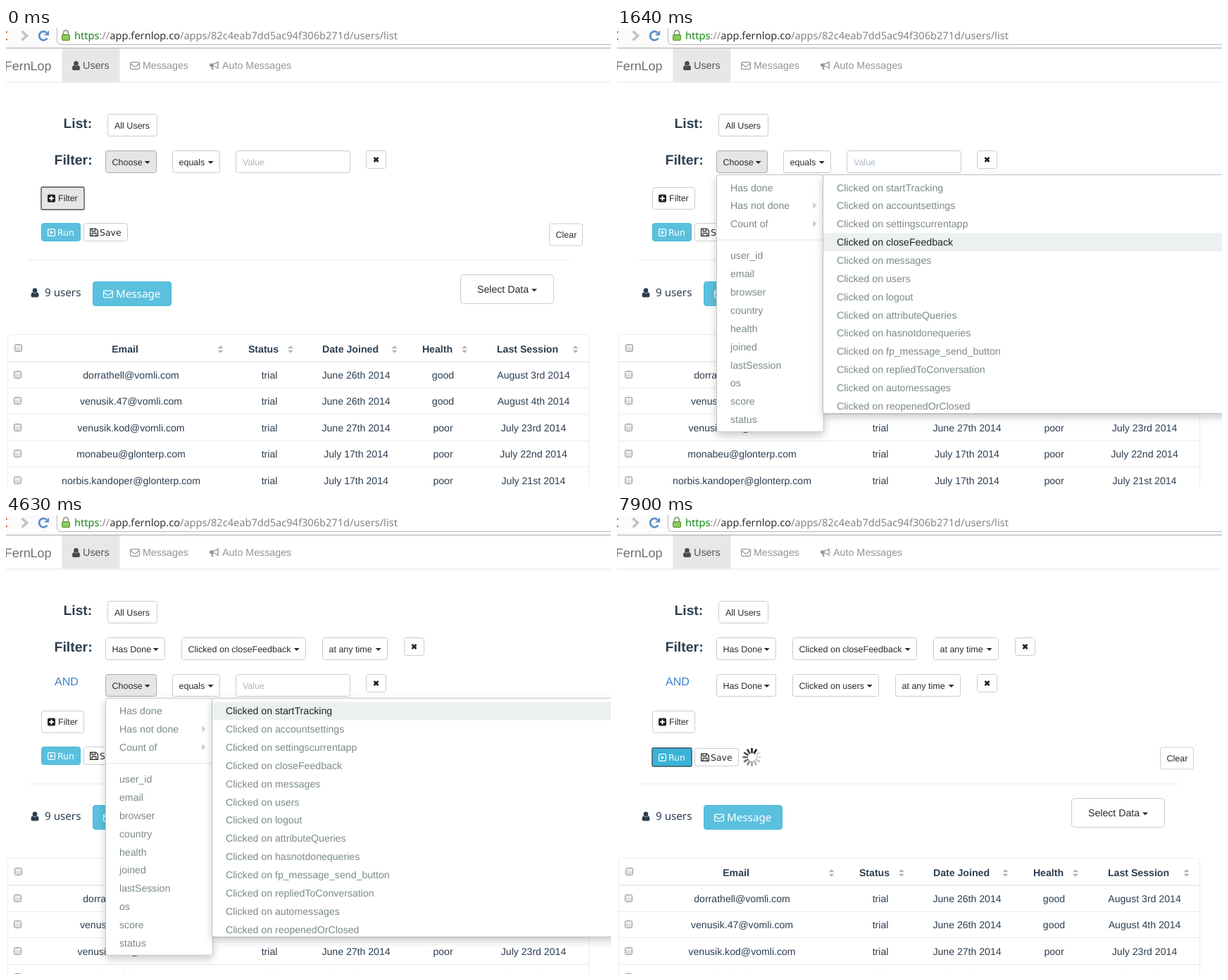
Write an HTML page that moves like this. It is 859x652 px and loops after 8000 ms.

```html
<!DOCTYPE html>
<html lang="en">
<head>
<meta charset="utf-8">
<title>User filter</title>
<style>
html, body { margin: 0; width: 100%; height: 100%; overflow: hidden; background: #fff; }
svg { display: block; width: 859px; height: 652px; }
text { font-family: "Liberation Sans", Arial, sans-serif; text-rendering: geometricPrecision; white-space: pre; }
.noto { font-family: "Noto Sans", "Open Sans", sans-serif; }
.deja { font-family: "DejaVu Sans", Verdana, sans-serif; }
.bold { font-weight: bold; }
.medium { font-weight: 500; }
.mid { text-anchor: middle; }
.end { text-anchor: end; }
.pop { filter: drop-shadow(0 5.7px 5.7px rgba(0, 0, 0, .2)); }
</style>
</head>
<body>
<svg id="stage" viewBox="0 0 859 652"></svg>
<script>
const LOOP = 8000, SHIFT = 52, ITEM = 25.87;
const INK = '#2c3e50', BTN = '#2b2b2b', GREY = '#7b8a8b', LINE = '#e9edee';
const BLUE = '#5bc0de', BLUE_EDGE = '#46b8da', PRESSED = '#e6e6e6';

const fields = ['user_id', 'email', 'browser', 'country', 'health', 'joined', 'lastSession', 'os', 'score', 'status'];
const events = ['startTracking', 'accountsettings', 'settingscurrentapp', 'closeFeedback', 'messages', 'users', 'logout',
  'attributeQueries', 'hasnotdonequeries', 'fp_message_send_button', 'repliedToConversation', 'automessages', 'reopenedOrClosed'];
const columns = [['Email', 169, 304.5], ['Status', 365.5, 404], ['Date Joined', 489, 551.5], ['Health', 612.5, 651], ['Last Session', 740.5, 808.5]];
const cellX = [177.5, 374, 497, 620.5, 749];
const people = [
  ['dorrathell@vomli.com', 'trial', 'June 26th 2014', 'good', 'August 3rd 2014'],
  ['venusik.47@vomli.com', 'trial', 'June 26th 2014', 'good', 'August 4th 2014'],
  ['venusik.kod@vomli.com', 'trial', 'June 27th 2014', 'poor', 'July 23rd 2014'],
  ['monabeu@glonterp.com', 'trial', 'July 17th 2014', 'poor', 'July 22nd 2014'],
  ['norbis.kandoper@glonterp.com', 'trial', 'July 17th 2014', 'poor', 'July 21st 2014']
];

// Times at which the pointer reaches "Has done" and then each event row
const hovers = [
  [450, 900, 1200, 1350, 1640],
  [4180, 4630, 4770, 4910, 5060, 5210, 5360]
];

const text = (x, y, s, size = 14.15, fill = INK, cls = '') =>
  `<text x="${x}" y="${y}" font-size="${size}" fill="${fill}" class="${cls}">${s}</text>`;
const path = (d, fill = 'none', stroke = 'none', w = 1) =>
  `<path d="${d}" fill="${fill}" stroke="${stroke}" stroke-width="${w}"/>`;
const box = (x, y, w, h, fill = '#fff', stroke = '#ccc', r = 3, sw = 1) =>
  `<rect x="${x + .5}" y="${y + .5}" width="${w - 1}" height="${h - 1}" rx="${r}" fill="${fill}" stroke="${stroke}" stroke-width="${sw}"/>`;
const bar = (x, y, w, h, fill) => `<rect x="${x}" y="${y}" width="${w}" height="${h}" fill="${fill}"/>`;
const move = (x, y, s) => `<g transform="translate(${x} ${y})">${s}</g>`;
const caret = (x, y) => path(`M${x} ${y}h8l-4 4z`, BTN);
const between = (t, a, b) => t >= a && t < b;

const person = (x, y, fill) => move(x, y,
  `<circle cx="5.5" cy="3.4" r="3.3" fill="${fill}"/>` +
  path('M0 10.5Q0 6 2.6 5.9Q5.5 8.4 8.4 5.9Q11 6 11 10.5Q11 13 8.8 13H2.2Q0 13 0 10.5z', fill));
const envelope = (x, y, c) => move(x, y,
  `<rect x=".6" y=".6" width="12.8" height="9.8" rx="1.4" fill="none" stroke="${c}" stroke-width="1.2"/>` +
  path('M1 2.8L5.6 6.4Q7 7.4 8.4 6.4L13 2.8', 'none', c, 1.2));
const horn = (x, y, c) => move(x, y,
  path('M12 1.2V10.2Q8.5 7.4 5 7.2V4.2Q8.5 4 12 1.2z', 'none', c, 1.3) +
  path('M1.5 3.6H5.4V7.8H4.4Q4.2 10 6 12H3.4Q2 10.4 2.4 7.8H1.5Q0 7.8 0 6.5V5Q0 3.6 1.5 3.6zM12.6 4.4q1.6 1.3 0 2.6z', c));
const cross = (x, y) => path(`M${x - 3} ${y - 3}l6 6m0 -6l-6 6`, 'none', '#222', 2.7);

function chrome() {
  const url = [['https', '#138a13'], ['://', '#8a8a8a'], ['app.fernlop.co', '#333'],
    ['/apps/82c4eab7dd5ac94f306b271d/users/list', '#858585']];
  return bar(0, 0, 859, 28, '#fbfbfb') + bar(0, 28, 859, 1, '#ababab') +
    path('M860 23.5H79Q72.5 23.5 72.5 17V-1H860z', '#fff', '#b9b9b9') +
    path('M0 6.5L1.5 5M0 15l1.5 2', 'none', '#d9541e', 2) +
    path('M22.5 4.5L29.5 11L22.5 17.5', 'none', '#c4c4c4', 3.6) +
    path('M58.5 14.5A6.2 6.2 0 1 1 57.5 6.5', 'none', '#5c8fca', 2.8) +
    path('M61 3.5V10.5H54z', '#5c8fca') +
    path('M81.5 10V6.8a3.4 3.4 0 0 1 6.8 0V10', 'none', '#8d9a80', 1.7) +
    box(79, 9, 12, 9, '#7cc04b', '#579a2c', 1) + path('M81 12.5h8m-8 2.5h8', 'none', '#a8dc80', 1) +
    text(97, 16, url.map(([s, c]) => `<tspan fill="${c}">${s}</tspan>`).join(''), 14.6, '#333', 'noto');
}

function navbar() {
  return bar(0, 76.5, 859, 1, '#e4e4e4') + bar(79.5, 29, 82, 47.5, '#e7e7e7') +
    text(64.5, 59.5, 'FernLop', 17.92, '#6f6f6f', 'end') +
    person(94, 47, '#4a4a4a') + text(109, 58, 'Users', 14.4, '#555') +
    envelope(176, 48, '#949494') + text(194, 58, 'Messages', 14.25, '#949494') +
    horn(289, 47, '#949494') + text(307, 58, 'Auto Messages', 14.25, '#949494');
}

function drop(x, y, w, label, on) {
  return box(x, y, w, 32, on ? PRESSED : '#fff', on ? '#adadad' : '#ccc') +
    text(x + 9.5, y + 20.5, label, 12.5, BTN) + caret(x + w - 17.3, y + 15);
}

const remove = (x, y) => box(x, y, 29, 26) + cross(x + 14.5, y + 13);

const emptyRow = (y, on) => drop(141, y, 73, 'Choose', on) + drop(236, y, 68, 'equals') +
  box(326, y, 163, 32) + text(336, y + 20.5, 'Value', 12.5, '#a9b7c2') + remove(511, y);

const doneRow = (y, event, w) => drop(141, y, 85, 'Has Done') + drop(249, y, w, 'Clicked on ' + event) +
  drop(272 + w, y, 93, 'at any time') + remove(388 + w, y);

function filterButton(state) {
  const rect = state === 'focus' ? box(49.5, 225.5, 62, 33, PRESSED, '#777', 2, 1.8)
    : state === 'hover' ? box(50, 226, 61, 32, PRESSED, '#adadad') : box(50, 226, 61, 32);
  return rect + `<rect x="59" y="236.5" width="11" height="11" rx="2" fill="#222"/>` +
    path('M64.5 238.7v6.6M61.2 242h6.6', 'none', '#fff', 2) + text(74, 246.3, 'Filter', 12.5, BTN);
}

function actions(t) {
  const focus = t >= 7750, hover = t >= 7310, save = between(t, 7010, 7310);
  const run = focus ? box(49.5, 276.5, 57, 27, '#39b3d7', '#4c7280', 2, 1.8)
    : box(50, 277, 56, 26, hover ? '#39b3d7' : BLUE, hover ? '#269abc' : BLUE_EDGE);
  const s = run +
    `<rect x="59.6" y="285.6" width="9.8" height="9.8" rx="1.6" fill="none" stroke="#fff" stroke-width="1.3"/>` +
    path('M62.8 287.8l4.4 2.7l-4.4 2.7z', '#fff') + text(73, 294.8, 'Run', 12.5, '#fff', 'deja') +
    box(110, 277, 63, 26, save ? PRESSED : '#fff', save ? '#adadad' : '#ccc') +
    path('M119.6 285.2h8l2.8 2.8v7.4h-10.8z', 'none', '#222', 1.2) +
    path('M122 285.2v3.4h4.6v-3.4M122 295.2v-3.8h6v3.8', 'none', '#222', 1.1) +
    text(133, 294.8, 'Save', 12.5, BTN, 'deja');
  return move(0, focus ? 2 : 0, s) + box(771, 277.5, 48, 32) + text(780.5, 298, 'Clear', 12.5, BTN);
}

const checkbox = (x, y) => box(x, y, 11, 11, '#dedede', '#9a9a9a', 2) + bar(x + 2, y + 2, 7, 3, '#ededed');

function table() {
  let s = path('M2.5 660V440Q2.5 435.5 7 435.5H823Q827.5 435.5 827.5 440V660', '#fff', LINE) +
    bar(2, 473, 826, 2, LINE) + checkbox(12, 449);
  for (const [name, x, sort] of columns)
    s += text(x, 460.5, name, 14.15, INK, 'bold mid') +
      path(`M${sort - 4} 455.3h8l-4 -4zM${sort - 4} 457.7h8l-4 4z`, '#b4b4b4');
  people.forEach((row, i) => {
    const y = 37.4 * i;
    s += bar(2, Math.round(511 + y), 826, 1, LINE) + checkbox(11, Math.round(487 + y));
    row.forEach((cell, c) => s += text(cellX[c], 498 + y, cell, 14.1, INK, 'mid'));
  });
  return s;
}

function results() {
  return bar(31, 329.5, 769, 1, '#ececec') + person(35.5, 369.5, INK) +
    text(55, 381, '9 users', 15.2, INK, 'noto medium') +
    box(123, 360, 112, 35, BLUE, BLUE_EDGE, 3.5) + envelope(138, 372.5, '#fff') +
    text(156, 383, 'Message', 15.2, '#fff', 'noto') +
    box(645, 350, 133, 42, '#fff', '#ccc', 4) + text(669, 376, 'Select Data', 14.15, BTN) + caret(746, 370.5) +
    table();
}

// hover: -2 main menu only, -1 "Has done" row, 0 and up an event row
function menu(hover) {
  let s = `<g class="pop">${box(141, 208, 153, 366, '#fff', '#c6c6c6', 3.5)}</g>`;
  if (hover === -1) s += bar(142, 213.7, 151, ITEM, '#ecf0f1');
  ['Has done', 'Has not done', 'Count of'].forEach((label, i) => {
    const y = 231.5 + ITEM * i;
    s += text(161, y, label, 14.15, hover === -1 && !i ? '#222' : GREY) +
      path(`M278.5 ${y - 10}l4.8 4.8l-4.8 4.8z`, i || hover === -2 ? '#ccc' : '#fff');
  });
  s += bar(142, 300.5, 151, 1, '#e2e2e2');
  fields.forEach((label, i) => s += text(161, 328.4 + ITEM * i, label, 14.15, GREY));
  if (hover < -1) return s;
  s += `<g class="pop">${box(292, 208, 600, 340, '#fff', '#bfbfbf', 3.5)}</g>`;
  if (hover >= 0) s += bar(293, 213.7 + ITEM * hover, 566, ITEM, '#ecf0f1');
  events.forEach((label, i) =>
    s += text(312, 231.5 + ITEM * i, 'Clicked on ' + label, 14.15, i === hover ? '#222' : GREY));
  return s;
}

function spinner(t) {
  const head = 13 + Math.floor((t - 7900) / 150);
  let s = '';
  for (let i = 0; i < 12; i++) {
    const age = (head - i + 24) % 12;
    s += `<path d="M0 -6.8V-12" transform="rotate(${i * 30})" stroke="#111" stroke-width="2.7" stroke-linecap="round" opacity="${Math.max(.16, 1 - age * .085).toFixed(2)}"/>`;
  }
  return move(191.5, 344, s);
}

function scene(t) {
  const two = t >= 3430;
  const focus = t < 150 || between(t, 3280, 3880);
  let s = chrome() + navbar() +
    text(81.5, 142.4, 'List:', 19.3, INK, 'bold') + box(144, 122, 71, 32) + text(154, 143, 'All Users', 12.5, BTN) +
    text(68.5, 194.4, 'Filter:', 19.5, INK, 'bold') +
    (t < 2390 ? emptyRow(174, true) : doneRow(174, 'closeFeedback', 177));
  if (two) s += text(69, 242, 'AND', 16.1, '#4180cc') +
    (t < 6110 ? emptyRow(226, t >= 3580) : doneRow(226, 'users', 123));
  s += move(0, two ? SHIFT : 0,
    filterButton(focus ? 'focus' : between(t, 2990, 3280) ? 'hover' : '') + actions(t) + results());
  const open = between(t, 150, 2390) ? 0 : between(t, 3880, 6110) ? 1 : -1;
  if (open >= 0) s += move(0, open * 2 * ITEM, menu(hovers[open].filter(at => t >= at).length - 2));
  return t >= 7750 ? s + spinner(t) : s;
}

const stage = document.getElementById('stage');
const start = performance.now();
let last = '';
function tick() {
  const s = scene((performance.now() - start) % LOOP);
  if (s !== last) stage.innerHTML = last = s;
  requestAnimationFrame(tick);
}
tick();
</script>
</body>
</html>
```
